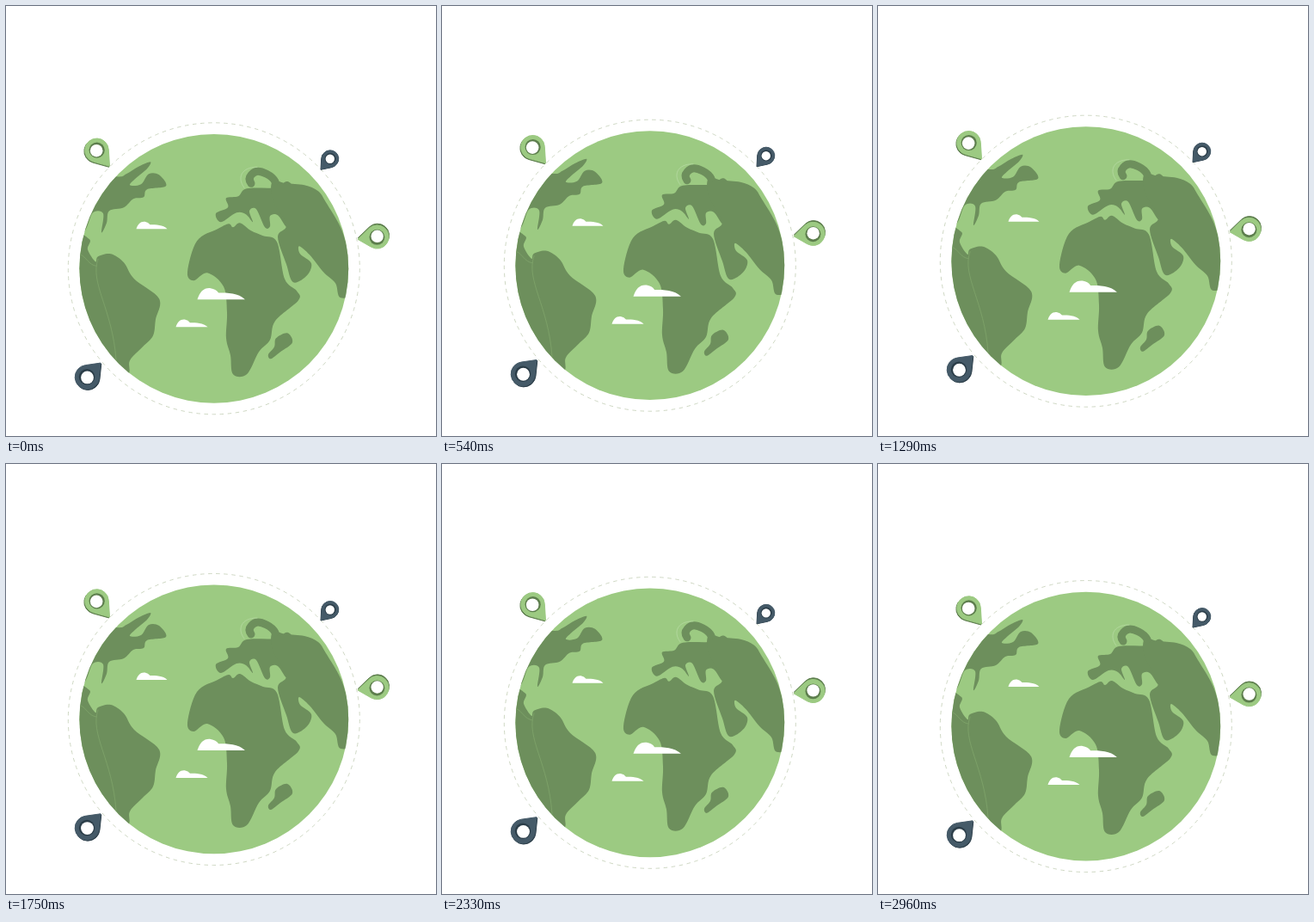
Write an HTML page that moves like this. It is 500 px wide and 500 px high and loops after 3 s.

```html
<!DOCTYPE html>
<html lang="en">
<head>
<meta charset="utf-8">
<title>Floating globe</title>
<style>
  html, body { margin: 0; width: 100%; height: 100%; overflow: hidden; background: #fff; }
  svg { display: block; width: 100%; height: 100%; }
</style>
</head>
<body>
<svg viewBox="0 0 500 500">
  <defs>
    <clipPath id="disc"><circle cx="241.8" cy="305" r="156.4"/></clipPath>
    <path id="cloud" d="M0 0C2 -6 5 -9 10 -8.500Q14 -8 16 -5C23 -5 31 -5 36 0Z"/>
  </defs>
  <g id="world">
    <circle cx="241.8" cy="305" r="169.5" fill="none" stroke="#c9d3bd" stroke-width=".9" stroke-dasharray="4.5 4.6"/>
    <circle cx="241.8" cy="305" r="156.4" fill="#9cca82"/>
    <g clip-path="url(#disc)">
      <g id="land" fill="#6d8f5c"></g>
      <g fill="none" stroke-linecap="round">
        <path d="M285 206C279 198 289 192 293 192S309 196 313 204" stroke="#6d8f5c" stroke-width="9"/>
        <path d="M107 294C97 322 124 352 128 411M87 289C93 291 96 301 105 302" stroke="#83a86e" stroke-width=".7"/>
        <path d="M277 211C269 201 272 187 292 187" stroke="#b9dba6" stroke-width=".7"/>
      </g>
    </g>
    <g fill="#fff">
      <use href="#cloud" transform="translate(151.500 259)"/>
      <use href="#cloud" transform="translate(222.500 341) scale(1.54)"/>
      <use href="#cloud" transform="translate(197.500 373) scale(1.03)"/>
    </g>
    <g id="pins"></g>
  </g>
</svg>
<script>
const LOOP = 3000, LIFT = 10, REST = 0.3;
const GREEN = ['#9cca82', '#5d7e4d'], NAVY = ['#455a68', '#2b3d48'];
const world = document.getElementById('world');
const land = document.getElementById('land');
const pins = document.getElementById('pins');

function draw(parent, tag, attrs) {
  const el = document.createElementNS('http://www.w3.org/2000/svg', tag);
  for (const key in attrs) el.setAttribute(key, attrs[key]);
  parent.append(el);
}

// Closed Catmull-Rom curve through a few key points.
function smooth(text) {
  const pts = text.split(' ').map(p => p.split(',').map(Number));
  const at = i => pts[(i + pts.length) % pts.length];
  const mix = (p, a, b) => p.map((v, k) => (v + (b[k] - a[k]) / 6).toFixed(1));
  return `M${pts[0]}` + pts.map((p, i) => {
    const next = at(i + 1);
    return `C${mix(p, at(i - 1), next)} ${mix(next, at(i + 2), p)} ${next}`;
  }).join('') + 'Z';
}

const coast = outline => draw(land, 'path', { d: smooth(outline) });

function teardrop(x, y, r, tipX, tipY) {
  const dir = Math.atan2(tipY - y, tipX - x);
  const spread = Math.acos(r / Math.hypot(tipX - x, tipY - y));
  const rim = a => `${x + r * Math.cos(a)} ${y + r * Math.sin(a)}`;
  return `M${tipX} ${tipY}L${rim(dir + spread)}A${r} ${r} 0 1 1 ${rim(dir - spread)}Z`;
}

// (dx, dy) is the direction in which the pin's thickness shows.
function pin(x, y, r, tipX, tipY, dx, dy, [front, side]) {
  const body = { d: teardrop(x, y, r, tipX, tipY), 'stroke-width': 1, 'stroke-linejoin': 'round' };
  draw(pins, 'path', { ...body, fill: side, stroke: side, transform: `translate(${dx} ${dy})` });
  draw(pins, 'path', { ...body, fill: front, stroke: front });
  draw(pins, 'circle', { cx: x - dx * .2, cy: y - dy * .2, r: r * .66, fill: side });
  draw(pins, 'circle', { cx: x + dx * .4, cy: y + dy * .4, r: r * .53, fill: '#fff' });
}

// The Americas
coast('80,190 128,198 140,195 155,186 168,181 164,189 151,200 144,208 157,207 166,195 178,196 186,209 164,213 160,222 148,224 137,234 120,238 117,252 111,263 113,241 101,240 93,259 80,275');
coast('75,268 97,271 95,283 104,297 107,291 122,288 137,298 149,317 178,340 174,364 171,383 159,396 144,412 141,430 110,450 70,350');
// Africa and its island
coast('259,253 246,259 222,273 211,309 218,319 234,310 253,326 257,356 256,386 261,406 264,428 280,428 294,402 307,388 313,366 340,342 338,331 324,317 315,274 299,267 285,261 272,252 264,257');
coast('305,405 312,396 314,386 327,380 333,391 319,402 308,410');
// Europe
coast('330,205 313,211 280,212 270,221 256,223 258,234 244,241 250,251 268,240 279,242 287,251 283,238 291,236 301,257 307,256 307,244 316,243 327,258 340,266 350,240');
// Asia
coast('310,203 325,206 347,208 363,215 372,228 389,257 398,285 410,330 389,339 383,322 369,309 353,289 341,279 342,288 355,299 350,313 334,321 326,300 316,268 326,254 310,225');

pin(105.5, 167.5, 13.8, 120.5, 186, -.8, 1, GREEN);
pin(431.5, 268.2, 13.6, 409, 271, .4, -1.7, GREEN);
pin(377, 177.3, 9.8, 366.5, 189.5, -.5, .5, NAVY);
pin(94.2, 431.2, 14, 110, 414.8, .8, 1, NAVY);

function render(time) {
  const phase = (time % LOOP) / LOOP;
  const lift = LIFT * (1 - Math.abs(1 - 2 * phase));
  world.setAttribute('transform', `translate(0 ${REST - lift})`);
}

const start = performance.now();
function tick() {
  render(performance.now() - start);
  requestAnimationFrame(tick);
}
tick();
</script>
</body>
</html>
```
